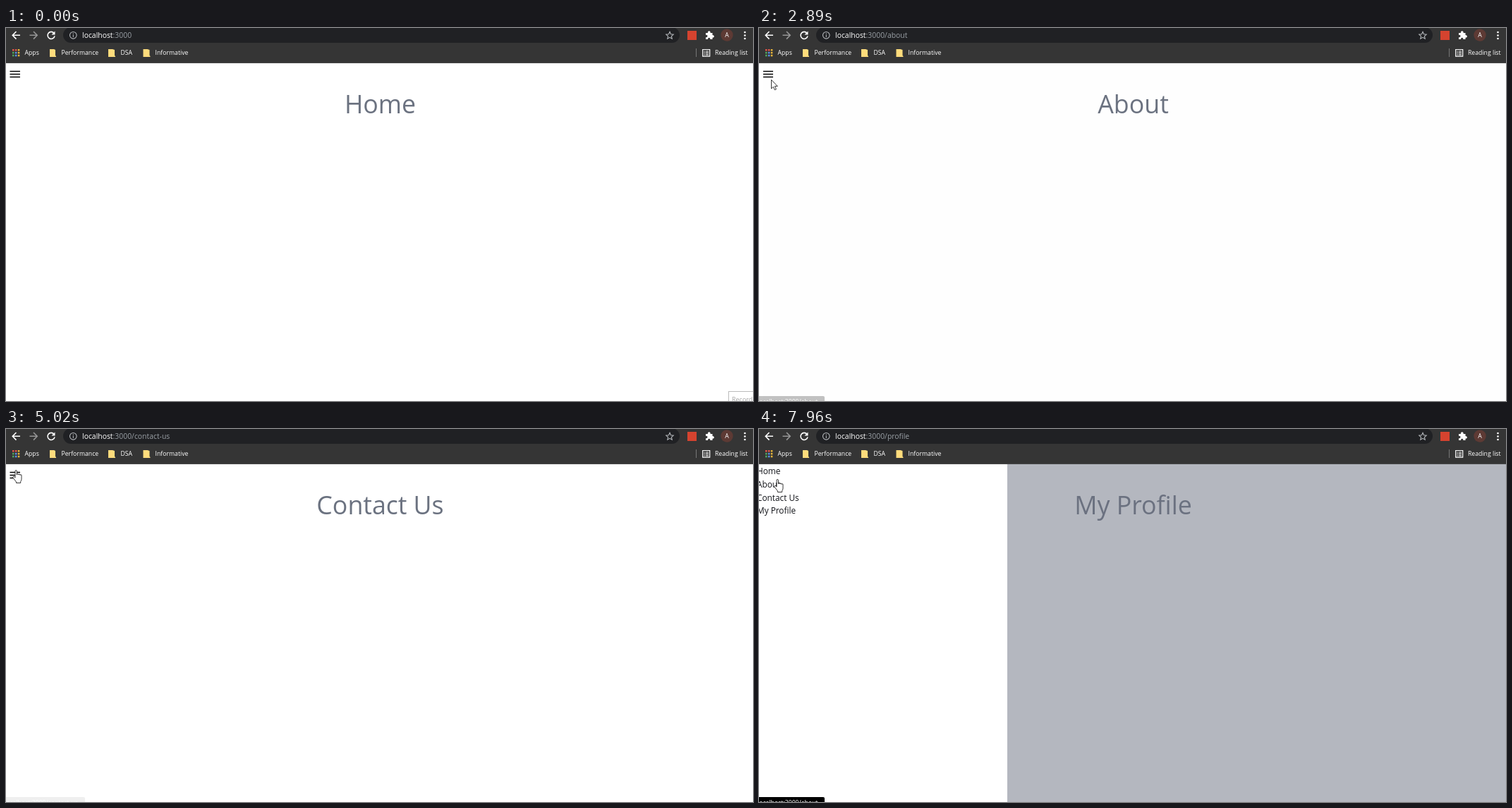
Animation, 1059 px wide and 529 px high, one loop 8000 ms. Source, as an HTML page:

```html
<!DOCTYPE html>
<html lang="en">
<head>
<meta charset="utf-8">
<title>Sliding menu</title>
<style>
  html, body { margin: 0; width: 100%; height: 100%; overflow: hidden; background: #fff; }
  svg { display: block; width: 1059px; height: 529px; font-family: "Open Sans", "Noto Sans", sans-serif; }
  .line { fill: none; stroke: #fff; stroke-width: 1.6; }
  .small { font-size: 8.7px; fill: #fff; }
</style>
</head>
<body>
<svg viewBox="0 0 1059 529">
  <rect width="1059" height="529" fill="#fff"/>
  <path d="M5.5 61.5h14.500M5.500 65.500h14.500M5.500 69.500h14.500" stroke="#000" stroke-width="1.5"/>
  <text id="heading" x="530.5" y="120.500" text-anchor="middle" font-size="35.7" fill="#6b7280"></text>
  <rect id="overlay" y="50" width="1059" height="479" fill="#6b7280"/>

  <g id="sidebar">
    <rect y="50" width="352" height="479" fill="#fff"/>
    <g font-size="11.8" fill="#111318">
      <text x="-3" y="64">Home</text>
      <text x="-3" y="82.7">About</text>
      <text x="-3" y="101.5">Contact Us</text>
      <text x="-3" y="120.3">My Profile</text>
    </g>
  </g>

  <g id="status">
    <path id="statusBox" fill="#000"/>
    <text id="statusText" class="small" x="-2" y="532.5"></text>
  </g>

  <!-- browser toolbar -->
  <rect width="1059" height="50" fill="#353535"/>
  <rect y="49" width="1059" height="1" fill="#4b4b4b"/>
  <rect x="81" y="-1" width="874" height="22" rx="11" fill="#202124"/>
  <path class="line" d="M20 10.3H9.5M14.5 5l-5.2 5.3 5.2 5.3"/>
  <path class="line" stroke-opacity=".48" d="M33.5 10.3H44M39 5l5.2 5.3-5.2 5.3"/>
  <path class="line" d="M68 7.3A5 5 0 1 0 69 11.3"/>
  <path d="M69.5 4.5v5h-5z" fill="#fff"/>
  <g fill="none" stroke="#b5b8bc" stroke-width="1.1">
    <circle cx="95.3" cy="10.3" r="4.8"/>
    <path d="M95.3 9.5v3.5M95.3 7.3v1.2"/>
    <path d="M941 5.3l1.5 3.4 3.7.4-2.8 2.500.8 3.600-3.200-1.900-3.200 1.900.8-3.600-2.800-2.500 3.700-.4z"/>
  </g>
  <text id="url" x="108" y="14" font-size="10.4" fill="#9aa0a6"><tspan fill="#fff">localhost</tspan><tspan>:3000</tspan><tspan id="path"></tspan></text>
  <rect x="966" y="4" width="13" height="13" fill="#d5432f"/>
  <path d="M992 7h3a1.9 1.9 0 1 1 3.5 0h3v3.2a1.8 1.8 0 1 1 0 3.4V16h-3.2a1.7 1.7 0 1 0-3.2 0H992v-3a1.7 1.7 0 1 0 0-3z" fill="#fff"/>
  <circle cx="1022" cy="10" r="8.7" fill="#5d3a34"/>
  <text class="small" x="1022" y="13.3" text-anchor="middle">A</text>
  <g fill="#fff">
    <circle cx="1047.5" cy="6" r="1.3"/><circle cx="1047.5" cy="10.5" r="1.3"/><circle cx="1047.5" cy="15" r="1.3"/>
  </g>
  <g id="apps"></g>
  <path d="M62 30h6l2 1v8l1 1v1h-9zM145 30h6l3 1v8l1 1v1h-10zM194.5 30h6l3 1v8l1 1v1h-10z" fill="#ffdc7c"/>
  <g class="small">
    <text x="26.5" y="38">Apps</text>
    <text x="78.5" y="38">Performance</text>
    <text x="162.5" y="38">DSA</text>
    <text x="211.5" y="38">Informative</text>
    <text x="1005" y="38">Reading list</text>
  </g>
  <path d="M978.5 29v12" stroke="#777"/>
  <path d="M987.7 30.5h10v9.7h-10zM989.5 33h1.3m1 0h4.2M989.5 35.4h1.3m1 0h4.2M989.5 37.8h1.3m1 0h4.2" fill="none" stroke="#fff" stroke-width="1.2"/>

  <g id="popup">
    <rect x="1024.5" y="515.5" width="60" height="30" fill="#fff" stroke="#bbb"/>
    <text x="1029" y="529.5" font-size="9" fill="#a3a3a3">Record</text>
  </g>

  <g id="cursor" fill="#fff" stroke="#222" stroke-width=".9" stroke-linejoin="round">
    <path id="arrow" d="M.5.5V13l2.8-2.6 2 4.4 2.1-.9-2-4.3h3.9z"/>
    <path id="hand" d="M4 11V1.8Q4 .5 5.2.5T6.4 1.8V7q0-1.3 1.2-1.3T8.8 7q.2-1 1.2-.9t1 1.3q.2-.9 1.1-.8T13 8v5q0 2-1.3 3.5V18.5H5.5V17L1 11.2Q.3 10 1.3 9.4T3 9.9z"/>
  </g>
</svg>

<script>
const LOOP = 8000, SLIDE = 300, PANEL = 352;
const el = id => document.getElementById(id);

const pages = [
  { from: 0, title: "Home", path: "" },
  { from: 2640, title: "About", path: "/about" },
  { from: 4400, title: "Contact Us", path: "/contact-us" },
  { from: 6330, title: "My Profile", path: "/profile" }
];

// Menu clicks: when each slide begins and whether it opens.
const slides = [[1666, 1], [2640, 0], [3650, 1], [4400, 0], [5290, 1], [6330, 0], [7274, 1]];

// Link previews: shown, fading from, gone, faintest opacity, path, width.
const previews = [
  [2440, 2700, 3190, 0, "/about", 93],
  [4280, 4750, 5270, .06, "/contact-us", 112],
  [6230, 6450, 6870, 0, "/profile", 97],
  [7880, LOOP, LOOP, 1, "/about", 93]
];

// Pointer: time, left, top, shape from that time on.
const pointer = [
  [70, 1010, 505, "arrow"], [470, 476, 248, "arrow"], [740, 476, 248, "arrow"],
  [1460, 12, 62, "hand"], [1530, 9, 58, "hand"], [1620, 9, 58, "hand"],
  [1690, 10, 62, "arrow"], [1820, 13, 77, "arrow"], [2040, 14, 76, "hand"],
  [2380, 17, 72, "hand"], [2780, 18, 72, "arrow"], [3190, 14, 74, "arrow"],
  [3600, 8, 66, "arrow"], [3720, 9, 66, "arrow"], [3940, 10, 88, "hand"],
  [4080, 10, 93, "hand"], [4530, 12, 93, "arrow"], [4840, 13, 74, "hand"],
  [5020, 9, 58, "hand"], [5270, 9, 58, "hand"], [5360, 11, 64, "arrow"],
  [5650, 16, 95, "hand"], [6010, 18, 108, "hand"], [6160, 17, 110, "hand"],
  [6330, 17, 110, "hand"], [6450, 18, 108, "arrow"], [6870, 17, 76, "arrow"],
  [7200, 14, 66, "arrow"], [7350, 14, 66, "arrow"], [7540, 17, 76, "hand"],
  [7620, 18, 78, "hand"], [7820, 18, 78, "hand"], [7960, 21, 71, "hand"]
];

const clamp = v => Math.max(0, Math.min(1, v));

// cubic-bezier(.4, 0, .2, 1)
function ease(x) {
  let lo = 0, hi = 1;
  for (let i = 0; i < 20; i++) {
    const s = (lo + hi) / 2, r = 1 - s;
    if (1.2 * r * r * s + .6 * r * s * s + s ** 3 < x) lo = s; else hi = s;
  }
  return 3 * lo * lo - 2 * lo ** 3;
}

function openness(t) {
  const last = slides.findLast(s => s[0] <= t);
  if (!last) return 0;
  const p = ease(clamp((t - last[0]) / SLIDE));
  return last[1] ? p : 1 - p;
}

function drawPointer(t) {
  const i = pointer.findLastIndex(k => k[0] <= t);
  el("cursor").style.display = i < 0 ? "none" : "";
  if (i < 0) return;
  const a = pointer[i], b = pointer[i + 1] || a;
  const p = b === a ? 0 : (t - a[0]) / (b[0] - a[0]);
  const at = n => Math.round(a[n] + (b[n] - a[n]) * p);
  el("cursor").setAttribute("transform", `translate(${at(1)} ${at(2)})`);
  for (const shape of ["arrow", "hand"])
    el(shape).style.display = a[3] === shape ? "" : "none";
}

function drawPreview(t) {
  const shown = previews.find(p => t >= p[0] && t < p[2]);
  el("status").style.display = shown ? "" : "none";
  if (!shown) return;
  const [, fade, , faintest, path, width] = shown;
  el("status").style.opacity = Math.max(faintest, 1 - clamp((t - fade) / 250));
  el("statusBox").setAttribute("d", `M0 522H${width - 2}q2 0 2 2V529H0z`);
  el("statusText").textContent = "localhost:3000" + path;
}

function draw(t) {
  const page = pages.findLast(p => p.from <= t);
  el("heading").textContent = page.title;
  el("path").textContent = page.path;
  const open = openness(t);
  el("overlay").setAttribute("opacity", open * .505);
  el("sidebar").setAttribute("transform", `translate(${Math.round((open - 1) * PANEL)} 0)`);
  el("popup").style.display = t < 70 ? "" : "none";
  drawPreview(t);
  drawPointer(t);
}

const appColors = ["#e0564a", "#e0564a", "#e8b63a", "#4fa65b", "#5a8fe6", "#e8b63a", "#4fa65b", "#5a8fe6", "#e8b63a"];
el("apps").innerHTML = appColors.map((color, i) =>
  `<rect x="${9 + i % 3 * 3.9}" y="${30 + Math.floor(i / 3) * 3.9}" width="2.5" height="2.5" fill="${color}"/>`).join("");

const start = performance.now();
function frame() {
  draw((performance.now() - start) % LOOP);
  requestAnimationFrame(frame);
}
frame();
</script>
</body>
</html>
```
